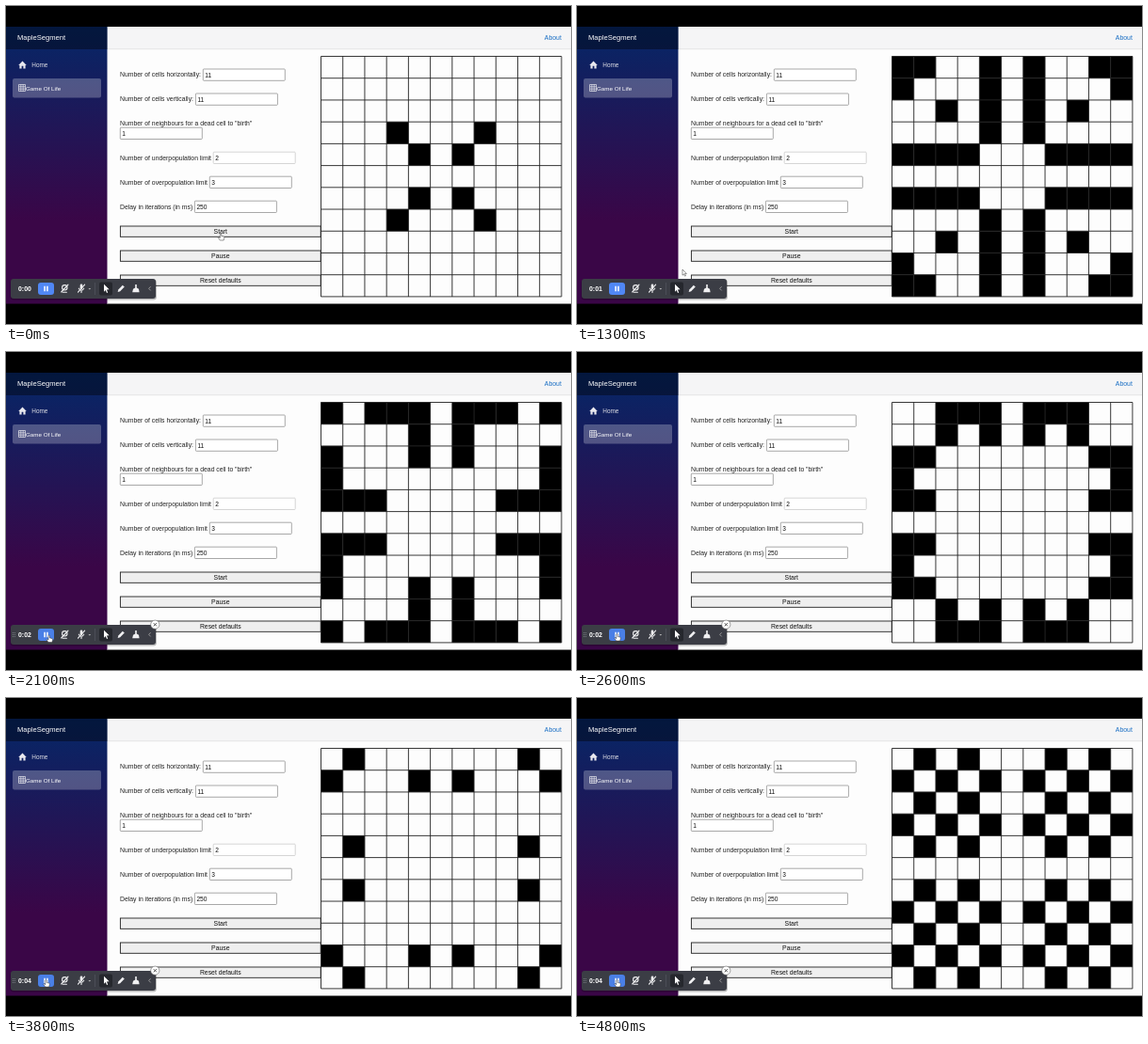
An HTML page that plays this animation: 600x338 px, repeating every 4900 ms.

```html
<!DOCTYPE html>
<html lang="en">
<head>
<meta charset="utf-8">
<title>Game Of Life</title>
<style>
html, body { margin: 0; width: 100%; height: 100%; overflow: hidden; background: #000; }
svg { display: block; width: 600px; height: 338px; }
text { font-family: "Liberation Sans", Arial, sans-serif; }
</style>
</head>
<body>
<svg id="stage" viewBox="0 0 600 338" xmlns="http://www.w3.org/2000/svg">
  <defs>
    <linearGradient id="side" x1="0" y1="0" x2="0" y2="1">
      <stop offset="0" stop-color="#052767"/>
      <stop offset=".7" stop-color="#3a0647"/>
    </linearGradient>
  </defs>
  <rect width="600" height="338" fill="#000"/>
  <rect x="107" y="22" width="493" height="294.5" fill="#fdfdfd"/>
  <rect x="107" y="22" width="493" height="24" fill="#f5f5f6"/>
  <path d="M107 45.8H600" stroke="#d6d5d5" stroke-width=".6"/>
  <rect y="22" width="107.5" height="294.5" fill="url(#side)"/>
  <rect y="22" width="107.5" height="24" fill="#000" fill-opacity=".4"/>
  <rect x="7" y="77" width="94" height="20.5" rx="2" fill="#fff" fill-opacity=".25"/>
  <path d="M13.2 63L17.5 58.6L21.8 63H20.6V66.6H18.4V63.8H16.6V66.6H14.4V63Z" fill="#e8e8ee"/>
  <path d="M13.5 83.5H20.5V90.5H13.5ZM15.8 83.5V90.5M18.2 83.5V90.5M13.5 85.8H20.5M13.5 88.2H20.5" fill="none" stroke="#e8e8ee" stroke-width=".7"/>
  <g id="page"></g>
  <g id="cells"></g>
  <path id="lines" fill="none" stroke="#222" stroke-width=".9"/>

  <g id="bar">
    <rect x="4.5" y="290.5" width="155.5" height="22" rx="3.5" fill="#000" fill-opacity=".25"/>
    <rect x="5" y="290" width="154" height="21" rx="3" fill="#3b3d45"/>
    <text id="clock" x="13" y="302.9" font-size="6.9" font-weight="bold" fill="#fff"></text>
    <rect id="pause" x="34" y="294" width="17" height="13" rx="3"/>
    <path d="M41.1 297.8V303.2M43.9 297.8V303.2" stroke="#fff" stroke-width="1.5"/>
    <g fill="none" stroke="#f0f0f2" stroke-width="1.1" stroke-linecap="round">
      <circle cx="62.3" cy="299.3" r="2.7"/>
      <path d="M60.2 304.2H64.4M58.7 304L66 296.2"/>
      <path d="M80 296.8V299.6" stroke-width="2.6"/>
      <path d="M77.3 300.2Q80 304.2 82.7 300.2M80 302.4V304.4M76.5 304.2L83.6 296.2"/>
    </g>
    <path d="M87.5 299.9H90.1L88.8 301.4Z" fill="#bbb"/>
    <path d="M94.5 294V307" stroke="#55575f" stroke-width=".7"/>
    <rect x="99" y="293.5" width="14" height="14" rx="2" fill="#25272d"/>
    <path d="M104 295.8L109.6 301.3L106.9 301.5L108.2 304.4L107 304.9L105.8 302.1L104 303.8Z" fill="#fff"/>
    <path d="M118.6 304L119.3 301.4L123.8 296.7L125.8 298.6L121.2 303.3Z" fill="#f0f0f2"/>
    <path d="M137.2 296H138.8V299.4L141 300.8L141.6 304.2H134.2L135 300.8L137.2 299.4Z" fill="#f0f0f2"/>
    <path d="M153.6 298.2L151.6 300.3L153.6 302.4" fill="none" stroke="#aaa" stroke-width=".8"/>
  </g>
  <g id="hover">
    <path d="M7.4 298V303M9.3 298V303" stroke="#999ba2" stroke-width=".8" stroke-dasharray=".9 1.1"/>
    <circle cx="158.3" cy="289.7" r="4.6" fill="#fff" stroke="#666" stroke-width=".6"/>
    <path d="M156.7 288.1L159.9 291.3M159.9 288.1L156.7 291.3" stroke="#333" stroke-width=".8"/>
  </g>
  <path id="arrow" d="M0 0V6.2L1.5 4.9L2.5 7.1L3.5 6.7L2.5 4.5H4.4Z" fill="#fff" stroke="#333" stroke-width=".5"/>
  <path id="hand" d="M-.7 0Q0 -.8 .7 0V2.4L3.4 3.1Q4 3.4 3.8 4.4L3.2 7H-.8L-2.7 4.3Q-2.6 3.4 -1.6 3.9L-.7 4.6Z" fill="#fff" stroke="#333" stroke-width=".5"/>
</svg>
<script>
const $ = id => document.getElementById(id);
const LOOP = 4900, N = 11, SIZE = 23.22, LEFT = 334.5, TOP = 53.5;

// Page text, fields and buttons
const label = (s, x, y, size = 6.85, fill = '#222', anchor = 'start') =>
  `<text x="${x}" y="${y}" font-size="${size}" fill="${fill}" text-anchor="${anchor}">${s}</text>`;
const field = (x, y, value, edge = '#858585') =>
  `<rect x="${x}" y="${y}" width="87" height="12.3" rx=".8" fill="#fff" stroke="${edge}" stroke-width=".7"/>` +
  label(value, x + 2, y + 8.6, 6.6, '#111');
const button = (s, y) =>
  `<rect x="121.4" y="${y}" width="212.8" height="11.3" fill="#efefef" stroke="#222" stroke-width=".9"/>` +
  label(s, 227.8, y + 8, 6.85, '#111', 'middle');

$('page').innerHTML =
  label('MapleSegment', 12, 36.2, 7.6, '#fff') +
  label('Home', 27.3, 65.2, 6.4, '#e0e0e6') +
  label('Game Of Life', 21, 89.5, 6.25, '#fff') +
  label('About', 571.8, 36.2, 6.9, '#1a6fc4') +
  label('Number of cells horizontally:', 121, 75.4) + field(209.3, 67, 11) +
  label('Number of cells vertically:', 121, 101.4) + field(201.4, 93, 11) +
  label('Number of neighbours for a dead cell to "birth"', 121, 126.8) + field(121.3, 129.2, 1) +
  label('Number of underpopulation limit', 121, 163.6) + field(220.2, 155.2, 2, '#c4c4c4') +
  label('Number of overpopulation limit', 121, 189.6) + field(216.3, 181.2, 3) +
  label('Delay in iterations (in ms)', 121, 215.6) + field(200.4, 207.2, 250) +
  button('Start', 234) + button('Pause', 260) + button('Reset defaults', 286);

let d = '';
for (let i = 0; i <= N; i++) {
  const k = i * SIZE, end = N * SIZE;
  d += `M${LEFT + k} ${TOP}v${end}M${LEFT} ${TOP + k}h${end}`;
}
$('lines').setAttribute('d', d);

// Birth with exactly one neighbour, survival with two or three
const at = (g, r, c) => r >= 0 && c >= 0 && r < N && c < N ? g[r * N + c] : 0;
function evolve(g) {
  return g.map((alive, i) => {
    const r = Math.floor(i / N), c = i % N;
    let n = -alive;
    for (let y = -1; y <= 1; y++)
      for (let x = -1; x <= 1; x++) n += at(g, r + y, c + x);
    return alive ? +(n === 2 || n === 3) : +(n === 1);
  });
}
const seed = Array.from({ length: N * N }, (_, i) => {
  const y = Math.abs(Math.floor(i / N) - 5), x = Math.abs(i % N - 5);
  return +(x === y && (x === 1 || x === 2));
});
const ticks = [200, 500, 800, 1100, 1400, 1600, 1900, 2100, 2400,
  2600, 2800, 3100, 3500, 3700, 4000, 4200, 4500, 4700];
const seconds = [900, 1900, 2900, 3800];
const gens = [seed];
for (const _ of ticks) gens.push(evolve(gens[gens.length - 1]));
const shapes = gens.map(g => g.map((alive, i) => alive
  ? `<rect x="${LEFT + i % N * SIZE}" y="${TOP + Math.floor(i / N) * SIZE}" width="${SIZE}" height="${SIZE}"/>`
  : '').join(''));

// Pointer path: time, x, y
const path = [[0, 228, 242], [700, 228, 242], [1300, 112, 280], [1600, 50, 303],
  [1900, 49, 303], [2300, 42.5, 300], [LOOP, 42.5, 300]];
function pointer(t) {
  const i = path.findIndex(p => p[0] > t);
  const [t0, x0, y0] = path[i - 1], [t1, x1, y1] = path[i];
  const k = (t - t0) / (t1 - t0), e = k * k * (3 - 2 * k);
  return [x0 + (x1 - x0) * e, y0 + (y1 - y0) * e];
}

const passed = (list, t) => list.filter(v => v <= t).length;
const show = (id, on) => $(id).setAttribute('visibility', on ? 'visible' : 'hidden');
let shown = -1;

function draw(t) {
  const gen = passed(ticks, t);
  if (gen !== shown) $('cells').innerHTML = shapes[shown = gen];
  $('clock').textContent = '0:0' + passed(seconds, t);

  const [x, y] = pointer(t);
  const over = t >= 1550, away = t >= 4000 && t < 4600;
  const onButton = over || (x > 121 && y < 245.5);
  for (const id of ['arrow', 'hand'])
    $(id).setAttribute('transform', `translate(${x} ${y})`);
  show('arrow', !onButton);
  show('hand', onButton && !away);
  show('hover', t >= 1500);
  $('pause').setAttribute('fill', over && !away ? '#4a7fe6' : '#5087f5');
}

function frame() {
  draw(performance.now() % LOOP);
  requestAnimationFrame(frame);
}
frame();
</script>
</body>
</html>
```
